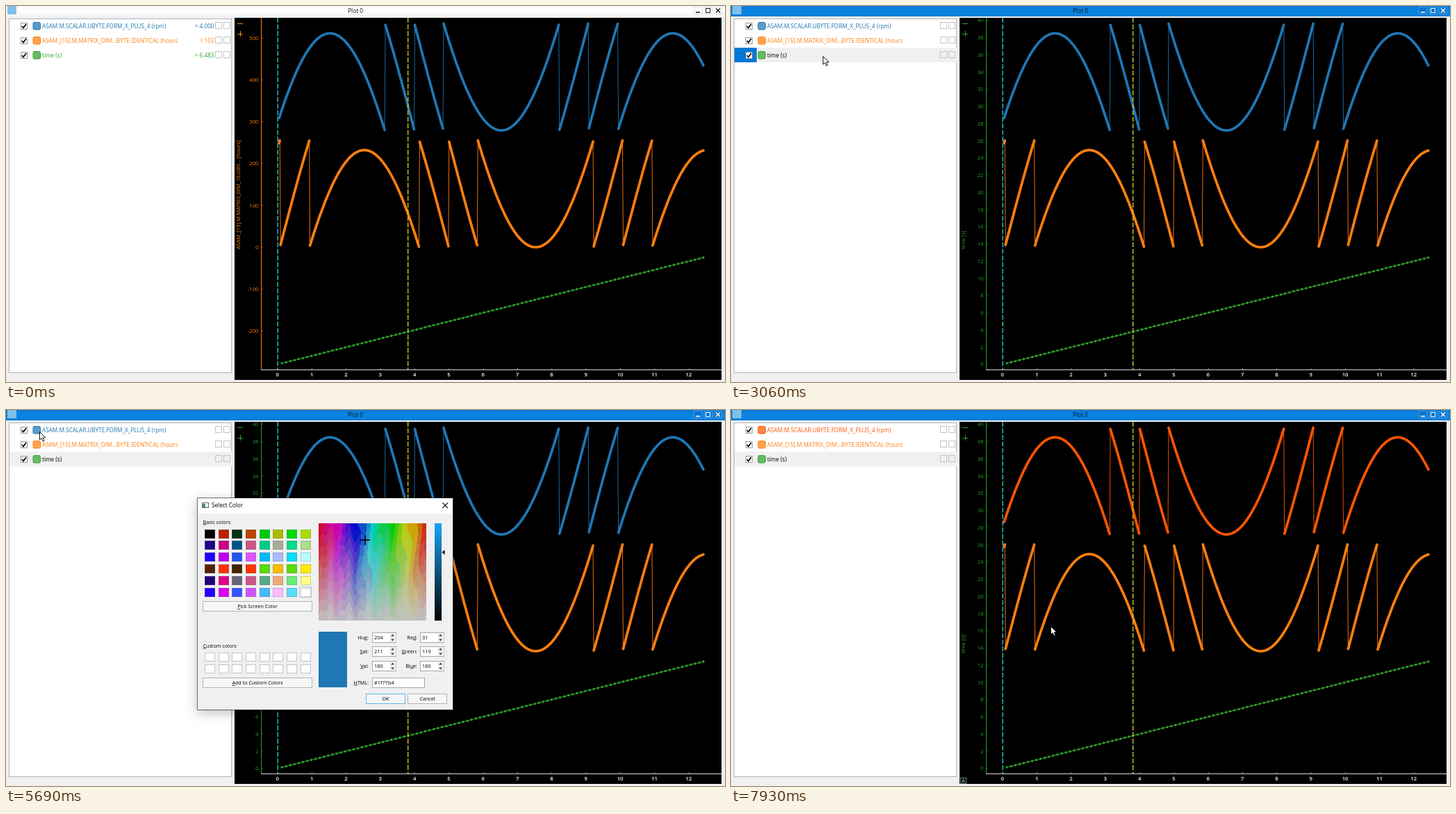
An HTML page with a canvas that plays this animation: 1035 by 541 pixels, repeating every 8000 ms.

```html
<!DOCTYPE html>
<html lang="en">
<head>
<meta charset="utf-8">
<title>Plot 0</title>
<style>
html, body { margin: 0; width: 100%; height: 100%; overflow: hidden; background: #f0f0f0; }
canvas { display: block; }
</style>
</head>
<body>
<canvas id="stage" width="1035" height="541"></canvas>
<script>
const g = document.getElementById('stage').getContext('2d');
const FONT = '"Open Sans", "Noto Sans", sans-serif';
const BLUE = '#1f77b4', ORANGE = '#ff7f0e', GREEN = '#2ca02c', RED = '#ff5500';
const LOOP = 8000;

// Pointer: time, x, y; each position holds until the next one
const PATH = [
  [200, 897, 523], [400, 700, 400], [600, 450, 240], [800, 260, 120], [1000, 150, 55], [1200, 116, 34],
  [1820, 119, 42], [2040, 121, 48], [2640, 124, 56], [2840, 130, 66], [3060, 132, 72], [3260, 132, 75],
  [3660, 128, 72], [3860, 114, 62], [4080, 94, 48], [4280, 88, 40], [4480, 85, 33], [4680, 83, 29],
  [4880, 50, 30], [5300, 48, 31], [5890, 120, 75], [6090, 280, 190], [6290, 343, 222], [6490, 350, 226],
  [6890, 400, 290], [7110, 490, 370], [7310, 546, 416], [7730, 540, 404], [7930, 460, 311]
];
const CLICKS = [[6490, 6690], [7530, 7730]];

const AXES = [
  { name: 'ASAM.M.SCALAR.UBYTE.FORM_X_PLUS_4 [rpm]', zero: 181.4, unit: .602, from: -500, to: 200, step: 100 },
  { name: 'ASAM_[15].M.MATRIX_DIM_16.UBY... [hours]', zero: 347, unit: .602, from: -200, to: 500, step: 100 },
  { name: 'time [s]', zero: 515.6, unit: 12.375, from: 0, to: 40, step: 2 }
];
const ROWS = [
  ['ASAM.M.SCALAR.UBYTE.FORM_X_PLUS_4 (rpm)', '= 4.000'],
  ['ASAM_[15].M.MATRIX_DIM...BYTE.IDENTICAL (hours', '= 103'],
  ['time (s)', '= 6.483']
];
const PALETTE = [
  '000 b20 031 b40 0c0 ab0 0d0 ad0', '208 c08 058 c58 0c8 aa9 0d8 ad8',
  '20f b0e 25e d5f 0bf abf 0df bff', '520 f30 420 f30 5d0 fb0 5d0 fe0',
  '207 d08 667 c58 5a8 ea7 6e7 ff8', '20f d0e 35f c5f 4bf fbf 5df fff'
].map(row => row.split(' '));

function box(x, y, w, h, fill, stroke) {
  if (fill) { g.fillStyle = fill; g.fillRect(x, y, w, h); }
  if (stroke) { g.strokeStyle = stroke; g.lineWidth = 1; g.strokeRect(x + .5, y + .5, w - 1, h - 1); }
}

function line(color, width, ...pts) {
  g.strokeStyle = color;
  g.lineWidth = width;
  g.beginPath();
  for (let i = 0; i < pts.length; i += 2) g.lineTo(pts[i], pts[i + 1]);
  g.stroke();
}

function shape(fill, ...pts) {
  g.fillStyle = fill;
  g.beginPath();
  for (let i = 0; i < pts.length; i += 2) g.lineTo(pts[i], pts[i + 1]);
  g.closePath();
  g.fill();
}

// An & marks the next letter as underlined
function text(label, x, y, color = '#000', size = 8.2, align = 'left', weight = 400) {
  g.font = `${weight} ${size}px ${FONT}`;
  g.fillStyle = color;
  const mark = label.indexOf('&'), str = label.replace('&', '');
  const w = g.measureText(str).width;
  x -= align === 'center' ? w / 2 : align === 'right' ? w : 0;
  y += size * .36;
  g.fillText(str, x, y);
  if (mark >= 0) {
    const left = g.measureText(str.slice(0, mark)).width;
    g.fillRect(x + left, y + 1, g.measureText(str[mark]).width, .7);
  }
}

function vertical(x, y, h, ...colors) {
  const fill = g.createLinearGradient(x, y, x, y + h);
  colors.forEach((c, i) => fill.addColorStop(i / (colors.length - 1), c));
  return fill;
}

function titleBar(active) {
  box(0, 0, 1035, 15, active ? vertical(0, 0, 15, '#0a7ad4', '#0a86e4', '#0a7cd6') : vertical(0, 0, 15, '#f8f8f8', '#fff', '#f2f2f2'));
  box(2, 0, 13, 12, '#7fc0e8');
  text('Plot 0', 503, 7.2, active ? '#001428' : '#111', 8.3, 'center', 500);
  const ink = active ? '#fff' : '#111';
  for (const x of [990, 1005, 1019]) box(x, 1, 12, 11, active ? '#0b74cc' : '#fff', active ? '#3c9ae6' : '#ddd');
  line(ink, 1.5, 993, 9, 999, 9);
  box(1007, 3, 7, 7, null, ink);
  line(ink, 1.5, 1022, 3.5, 1028, 9.5);
  line(ink, 1.5, 1028, 3.5, 1022, 9.5);
}

function checkbox(x, y) {
  box(x, y, 10, 10, '#fff', '#999');
  line('#000', 1.7, x + 2, y + 5, x + 4, y + 7.5, x + 8, y + 2);
}

function list(s) {
  box(4, 18, 321, 510, '#fff', '#b0b4b8');
  ROWS.forEach(([name, value], i) => {
    const y = 29 + 21 * i, on = s.row === i;
    if (on) {
      box(5, y - 11, 320, 21, '#f0f0f0');
      if (s.focus) box(5, y - 11, 32, 21, '#0078d7');
    }
    checkbox(21, y - 5);
    g.beginPath();
    g.roundRect(39, y - 5.5, 10.5, 10.5, 2);
    g.fillStyle = s.colors[i];
    g.fill();
    g.fillStyle = 'rgba(255,255,255,.28)';
    g.fill();
    g.strokeStyle = s.colors[i];
    g.lineWidth = 1;
    g.stroke();
    const ink = on ? '#000' : s.colors[i];
    text(name, 52, y, ink);
    if (s.values) text(value, 299.5, y, ink, 8.2, 'right');
    for (const x of [301, 313]) box(x, y - 6, 10, 10, on ? '#f0f0f0' : '#fff', '#c4c4c4');
  });
}

const px = t => 391.2 + 49.33 * t;

// A sine of amplitude 500 stored in one byte, so it wraps at 256
function wave(color, peak, base) {
  let old;
  const jumps = new Path2D(), runs = new Path2D();
  for (let t = .04; t <= 12.43; t += .02) {
    const v = 500 * (1 + Math.cos(Math.PI * (t - peak) / 5));
    const x = px(t), y = base - .602 * (v % 256), turn = Math.floor(v / 256);
    if (old && old.turn === turn) runs.lineTo(x, y);
    else {
      if (old) { jumps.moveTo(old.x, old.y); jumps.lineTo(x, y); }
      runs.moveTo(x, y);
    }
    old = { x, y, turn };
  }
  g.strokeStyle = color;
  g.lineWidth = .9;
  g.stroke(jumps);
  g.lineWidth = 3.7;
  g.lineCap = g.lineJoin = 'round';
  g.stroke(runs);
  g.lineCap = 'butt';
  g.lineJoin = 'miter';
}

function ramp(color) {
  const y = t => 515.6 - 12.375 * t;
  line(color, 1, px(.12), y(.12), px(12.42), y(12.42));
  g.fillStyle = color;
  for (let i = 0; i <= 100; i++) {
    const t = .12 + .123 * i;
    g.beginPath();
    g.arc(px(t), y(t), 1.75, 0, 7);
    g.fill();
  }
}

function plot(s) {
  box(329, 17, 701, 521, '#000');
  const axis = AXES[s.axis], color = s.colors[s.axis];
  line(color, 1, 367.5, 17, 367.5, 523);
  for (let v = axis.from; v <= axis.to; v += axis.step) {
    const y = axis.zero - v * axis.unit;
    text(String(v), 363.5, y, color, 7.7, 'right');
    line(color, .6, 367, y, 370, y);
  }
  line('#d8d8d8', 1, 367, 523.5, 1030, 523.5);
  for (let t = 0; t <= 12; t++) {
    text(String(t), px(t) - .4, 530.3, '#fff', 7.7, 'center', 600);
    line('#d8d8d8', .6, px(t), 521, px(t), 523);
  }
  g.save();
  g.translate(334.5, 350);
  g.rotate(-Math.PI / 2);
  text(axis.name, 0, 0, color, 7.7);
  g.restore();
  line(color, 1, 333, 25.5, 341, 25.5);
  line(color, 1, 333, 40.5, 341, 40.5);
  line(color, 1, 337.5, 36, 337.5, 44);

  wave(s.colors[0], 1.525, 179);
  if (s.orange) wave(s.colors[1], 2.525, 347);
  ramp(s.colors[2]);

  g.setLineDash([7, 2.5]);
  line('#2bb8c4', 1.5, px(0), 17, px(0), 523);
  line('#c4bc24', 1.5, px(3.8), 17, px(3.8), 523);
  g.setLineDash([]);
  if (s.hover) {
    box(330, 529, 9, 9, '#000', '#5a8a8a');
    text('A', 334.5, 533.5, '#ddd', 7.7, 'center');
  }
}

function button(label, x, y, w, h, border = '#b4b4b4', fill = '#f6f6f6') {
  box(x, y, w, h, fill, border);
  text(label, x + w / 2, y + h / 2, '#000', 7.2, 'center');
}

function field(label, value, right, x, y, w, spin) {
  text(label, right, y, '#000', 7.2, 'right');
  box(x, y - 7, w, 15, '#fff', '#a8a8a8');
  text(value, x + 3, y, '#000', 7.4);
  if (!spin) return;
  const c = x + w - 5.5;
  box(c - 4, y - 6, 9, 13, '#f0f0f0');
  shape('#444', c - 2.5, y - 1.5, c + 2.5, y - 1.5, c, y - 4.5);
  shape('#444', c - 2.5, y + 2.5, c + 2.5, y + 2.5, c, y + 5.5);
}

// Hue across, saturation down, both rounded to wavy steps
function makeSpectrum() {
  const can = document.createElement('canvas'), c = can.getContext('2d');
  can.width = 155;
  can.height = 140;
  for (let x = 0; x < 155; x++) {
    for (let y = 0; y < 140; y++) {
      const u = x / 155, v = y / 140;
      const hue = 360 - 360 / 19 * (Math.floor(u * 19 + .45 * Math.sin(v * 9 + u * 25)) + .5);
      const wave = .45 * Math.sin(u * 36 - 8) + .35 * Math.sin(u * 71);
      const grey = Math.min(1, Math.max(0, (Math.floor(v * 9 + wave) + .5) / 9));
      c.fillStyle = `hsl(${hue}, 100%, 40%)`;
      c.fillRect(x, y, 1, 1);
      c.fillStyle = `rgba(194,194,194,${grey})`;
      c.fillRect(x, y, 1, 1);
    }
  }
  return can;
}
const spectrum = makeSpectrum();

function picker(p) {
  g.drawImage(spectrum, 450, 163);
  g.save();
  g.beginPath();
  g.rect(450, 163, 155, 140);
  g.clip();
  const x = 450 + 155 * (1 - p.hsv[0] / 360), y = 163 + Math.max(3, 140 * (1 - p.hsv[1] / 255));
  line('#000', 1.6, x - 7, y, x + 7, y);
  line('#000', 1.6, x, y - 7, x, y + 7);
  g.restore();
  box(617, 163, 10, 140, vertical(617, 163, 140, p.bright, '#000'));
  const v = 163 + 140 * (1 - p.hsv[2] / 255);
  shape('#000', 627.5, v + .5, 631.5, v - 3, 631.5, v + 4);
}

function dialog(p, pressed) {
  g.save();
  g.shadowColor = 'rgba(0,0,0,.28)';
  g.shadowBlur = 16;
  g.shadowOffsetY = 4;
  box(276, 127, 367, 304, '#f0f0f0');
  g.restore();
  box(276, 127, 367, 22, '#fff');
  box(275, 126, 369, 306, null, 'rgba(60,60,60,.7)');
  box(282, 133, 10, 8, '#fff', '#666');
  box(283, 135, 4, 5, '#3c9678');
  text('Select Color', 296, 137.5);
  line('#111', 1.1, 628.5, 133.5, 636, 141);
  line('#111', 1.1, 636, 133.5, 628.5, 141);

  text('&Basic colors', 283.5, 161, '#000', 7.2);
  text('&Custom colors', 283.5, 339, '#000', 7.2);
  const col = i => Math.round(286 + 19.68 * i);
  PALETTE.forEach((row, r) => row.forEach((c, i) => {
    box(col(i), Math.round(171.6 + 16.85 * r), 15, 13, '#' + c, 'rgba(120,120,120,.35)');
  }));
  if (p.last) box(422, 254, 18, 16, null, '#b4cce4');
  for (const y of [349, 366]) for (let i = 0; i < 8; i++) box(col(i), y, 15, 13, '#fff', '#c4c4c4');
  button('&Pick Screen Color', 283, 275, 158, 15);
  button('&Add to Custom Colors', 283, 385, 158, 15);

  picker(p);
  box(450, 319, 41, 80, p.color);
  ['Hu&e:', '&Sat:', '&Val:'].forEach((s, i) => field(s, String(p.hsv[i]), 522, 527, 327 + 20.5 * i | 0, 35, true));
  ['Re&d:', '&Green:', 'Bl&ue:'].forEach((s, i) => field(s, String(p.rgb[i]), 592, 596, 327 + 20.5 * i | 0, 35, true));
  field('&HTML:', p.color, 522, 527, 392, 76);
  button('OK', 518, 408, 57, 15, '#62b4ea', pressed ? '#cfd8e0' : '#f2f6fa');
  button('Cancel', 578, 408, 57, 15);
}

function pointer(t) {
  const at = PATH.filter(k => k[0] <= t).pop();
  if (!at) return;
  const [, x, y] = at;
  if (CLICKS.some(([a, b]) => t >= a && t < b)) {
    g.fillStyle = 'rgba(245,225,20,.78)';
    g.beginPath();
    g.arc(x, y, 8, 0, 7);
    g.fill();
  }
  const arrow = [0, 0, 0, 11.5, 2.7, 9.2, 4.6, 13.6, 6.6, 12.7, 4.7, 8.4, 8.3, 8.2].map((v, i) => v + (i % 2 ? y : x) + .5);
  shape('#fff', ...arrow);
  line('#000', .9, ...arrow, arrow[0], arrow[1]);
}

const FIRST = { color: BLUE, bright: '#18a4f4', hsv: [204, 211, 180], rgb: [31, 119, 180], last: true };
const SECOND = { color: RED, bright: RED, hsv: [20, 255, 255], rgb: [255, 85, 0] };

function draw(t) {
  const row = t < 1420 ? -1 : t < 2040 ? 0 : t < 2840 ? 1 : 2;
  const state = {
    row,
    axis: row < 0 ? 1 : row,
    focus: t < 5500,
    values: t < 1420,
    orange: t < 2040 || t >= 2240,
    hover: t >= 7930,
    colors: [t < 7730 ? BLUE : RED, ORANGE, GREEN]
  };
  box(0, 0, 1035, 541, '#f0f0f0');
  titleBar(t >= 1420);
  list(state);
  plot(state);
  if (t >= 5500 && t < 7730) dialog(t < 6690 ? FIRST : SECOND, t >= 7530);
  pointer(t);
}

const start = performance.now();
function tick() {
  draw((performance.now() - start) % LOOP);
  requestAnimationFrame(tick);
}
tick();
</script>
</body>
</html>
```
